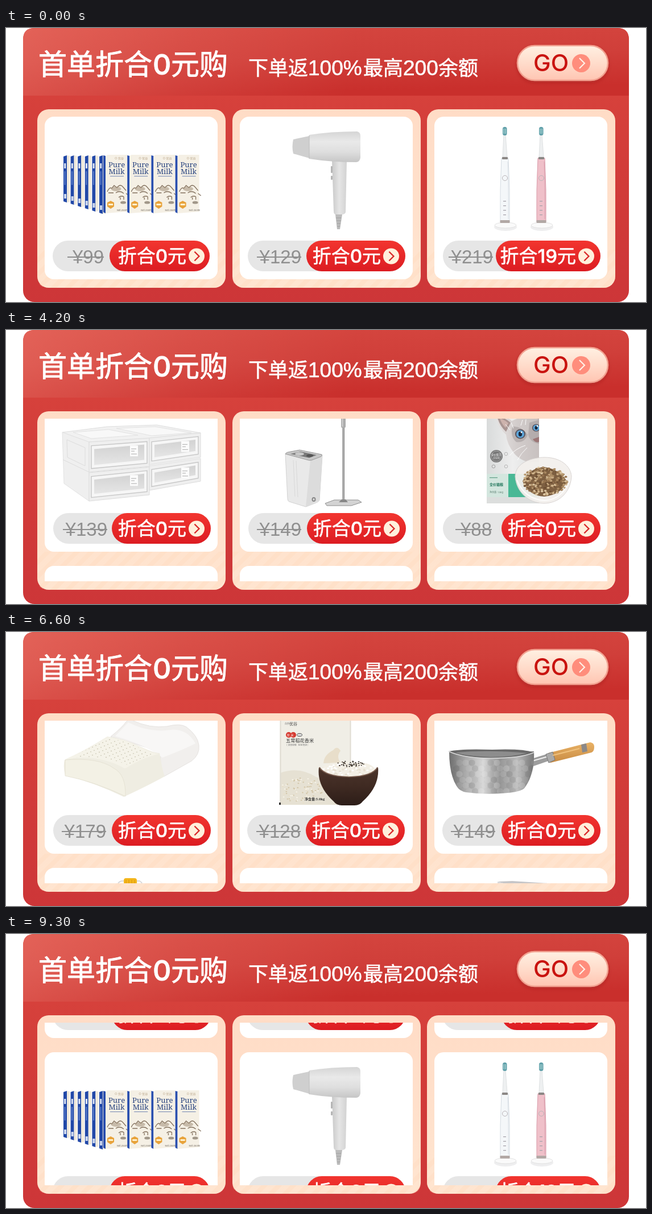
An HTML page for the animation above (9.4 s loop, 1125 by 482 pixels).

```html
<!DOCTYPE html>
<html lang="zh">
<head>
<meta charset="utf-8">
<style>
html, body { margin: 0; width: 100%; height: 100%; overflow: hidden; background: #fff; }
svg { display: block; width: 100vw; height: 100vh; }
text { font-family: Inter, 'Noto Sans CJK SC', 'Noto Sans CJK', sans-serif; }
.serif { font-family: 'Noto Serif', 'Noto Sans CJK SC', serif; }
.digits { font-family: 'Liberation Sans', 'Noto Sans CJK SC', sans-serif; }
.title { font-weight: 500; stroke: #fff; stroke-width: .9px; }
.medium { font-weight: 500; stroke: #fff; stroke-width: .6px; }
</style>
</head>
<body>
<svg id="stage" viewBox="0 0 1125 482" xmlns="http://www.w3.org/2000/svg"></svg>
<script>
const LOOP = 9400, PITCH = 311, STEPS = 6, STEP_MS = 100;
const SLIDES = [1800, 4200, 6600, 8900];

let seed = 7;
const rand = () => (seed = (seed * 16807) % 2147483647) / 2147483647;
const times = (n, fn) => Array.from({ length: n }, (_, i) => fn(i)).join('');

const path = (d, fill, more = '') => `<path d="${d}" fill="${fill}" ${more}/>`;
const line = (d, stroke, width = 1, more = '') => path(d, 'none', `stroke="${stroke}" stroke-width="${width}" ${more}`);
const rect = (x, y, w, h, fill, rx = 0, more = '') =>
  `<rect x="${x}" y="${y}" width="${w}" height="${h}" rx="${rx}" fill="${fill}" ${more}/>`;
const oval = (cx, cy, rx, ry, fill, more = '') =>
  `<ellipse cx="${cx}" cy="${cy}" rx="${rx}" ry="${ry}" fill="${fill}" ${more}/>`;
const text = (x, y, size, fill, str, more = '') =>
  `<text x="${x}" y="${y}" font-size="${size}" fill="${fill}" ${more}>${str}</text>`;
const gradient = (id, stops, dir = 'x2="0" y2="1"') => `<linearGradient id="${id}" ${dir}>` +
  stops.map((c, i) => `<stop offset="${i / (stops.length - 1)}" stop-color="${c}"/>`).join('') + '</linearGradient>';
const clip = (id, d) => `<clipPath id="${id}"><path d="${d}"/></clipPath>`;
const clipped = (id, body) => `<g clip-path="url(#${id})">${body}</g>`;
const specks = (n, cx, cy, rx, ry, size, colors) => times(n, () => {
  const a = rand() * 6.283, r = Math.sqrt(rand());
  const x = cx + Math.cos(a) * r * rx, y = cy + Math.sin(a) * r * ry;
  return oval(x.toFixed(1), y.toFixed(1), size, size * .75, colors[Math.floor(rand() * colors.length)]);
});

function milk() {
  const side = times(6, i => {
    const x = 101 + i * 12.6, b = 306 + i * 4;
    return path(`M${x} 226L${x + 6} 224V${b + 1}L${x} ${b - 1}Z`, '#2148a8') +
      path(`M${x + 6} 224L${x + 11} 225V${b}L${x + 6} ${b + 1}Z`, '#efe9dc') +
      rect(x + 1.2, 238, 3, 9, '#dfe6f5') + rect(x + 1.5, 252, 2, 24, '#5d7fcb') + rect(x + 1, b - 14, 4, 8, '#cfd9ef');
  });
  const front = times(4, i => {
    const x = 175 + i * 42.2, c = x + 19.5;
    const hills = `M${x + 3} 288q4-9 8-6l4-5 5 4q6-8 11-1l5 6m-31 4h9m4 0q7-5 14 1m-9 7q5-4 9-1v5m-6-4v4m10-11l5 4`;
    return path(`M${x - 4} 224L${x} 225V326L${x - 4} 324Z`, '#2a4fae') +
      path(`M${x} 226L${x + 3} 223H${x + 38}V323L${x} 326Z`, '#f5f0e5') +
      text(x + 24, 231, 5, '#b9a58a', '○ 优谷', 'text-anchor="middle"') +
      ['Pure', 'Milk'].map((s, k) => text(c, 245 + k * 11.5, 13, '#28437f', s, 'class="serif" text-anchor="middle"')).join('') +
      rect(x + 8, 260, 24, 1.3, '#8d9bbd') +
      line(hills, '#84725f', 1.3) + oval(c - 1, 283, 9, 4, '#a99882', 'opacity=".6"') + oval(x + 31, 307, 5, 2.5, '#7d7062', 'opacity=".7"') +
      path(`M${x + 9} 304l6 3v7l-6 4-6-4v-7Z`, '#e8a33b') + rect(x + 5, 309, 8, 3, '#fff1ce') +
      text(x + 20, 322, 4, '#6f675e', 'Net:250ml');
  });
  return side + front;
}

const dryer = () =>
  path('M573 233H599L597 324Q596 328 590 328H580Q576 328 576 322Z', 'url(#gripTone)') +
  path('M579 328H591L587 354H582Z', '#bcbcbc') + line('M580 334h9m-8 5h8m-7 5h6m-6 5h5', '#999', .8) +
  path('M533 188Q570 182 617 182Q623 183 623 190V228Q622 235 616 236Q570 236 533 230Z', 'url(#dryerTone)') +
  path('M505 196L533 190V229L505 221Q502 209 505 196Z', '#cfcfcf') + line('M533 189V230', '#bdbdbd') +
  rect(571, 243, 3, 12, '#b5b5b5', 1) + rect(571, 260, 3, 7, '#b5b5b5', 1);

const brush = (x, tone, edge) =>
  oval(x + 1, 350, 20, 7, '#eeeeef') + oval(x + 1, 347, 19, 5, '#fafafa', 'stroke="#e2e2e2"') +
  path(`M${x - 2} 187L${x - 4} 227H${x + 4}L${x + 1} 187Z`, '#eef0f1', 'stroke="#d9dcde" stroke-width=".8"') +
  rect(x - 4, 174, 7.5, 15, '#5f9fa9', 3.5) + line(`M${x - 2} 177v9m3-9v9`, '#c9e9e4', 1) +
  path(`M${x - 6} 229H${x + 6}Q${x + 9} 285 ${x + 8} 341H${x - 8}Q${x - 9} 285 ${x - 6} 229Z`, tone, `stroke="${edge}" stroke-width="1"`) +
  line(`M${x + 5} 235Q${x + 7} 290 ${x + 6} 336`, edge, 1.5, 'opacity=".6"') +
  rect(x - 5, 227, 10, 4, '#8b8785', 1) + rect(x - 8.5, 338, 17, 5, '#b2a8a5', 1) +
  oval(x, 264, 4.5, 4.5, tone, 'stroke="#b9b4b8"') + times(4, i => rect(x - 3, 304 + i * 8, 5, 1.3, '#a5a2aa'));

function drawers() {
  const unit = (x1, x2, y1, y2, h1, h2) => {
    const ix = x1 + 4, jx = x2 - 4, slope = (y2 - y1) / (x2 - x1);
    const at = (x, k) => (y1 + slope * (x - x1) + k).toFixed(1);
    const label = jx - 30;
    return path(`M${x1} ${y1}L${x2} ${y2}V${y2 + h2}L${x1} ${y1 + h1}Z`, '#efefef', 'stroke="#dcdcdc"') +
      path(`M${ix} ${at(ix, 7)}L${jx} ${at(jx, 6)}V${at(jx, h2 - 6)}L${ix} ${at(ix, h1 - 6)}Z`, '#f6f6f6', 'stroke="#c4c4c4" stroke-width="1.3"') +
      path(`M${ix + 5} ${at(ix + 5, 13)}L${jx - 5} ${at(jx - 5, 11)}V${at(jx - 5, h2 - 12)}L${ix + 5} ${at(ix + 5, h1 - 12)}Z`, 'url(#drawerTone)') +
      rect(label, at(label, 11), 14, 19, '#fbfbfb') + line(`M${label + 2} ${at(label, 17)}h9m-9 4h6m-6 5h10`, '#bbb', 1.2);
  };
  return path('M99 232L178 222L265 219L342 233L252 243L146 249Z', '#f1f1f1', 'stroke="#dedede"') +
    path('M118 232L180 227L232 237L150 243ZM194 225L262 222L326 233L256 238Z', '#f8f8f8', 'stroke="#e2e2e2"') +
    path('M99 232L146 249V353L102 322Z', '#efefef', 'stroke="#e2e2e2"') + line('M100 280L146 302M107 245L139 259V291L108 276Z', '#dcdcdc') +
    unit(146, 252, 249, 242, 53, 50) + unit(146, 252, 303, 293, 50, 49) +
    unit(252, 342, 242, 233, 47, 43) + unit(252, 342, 291, 278, 43, 40);
}

const mop = () =>
  path('M491 270L535 281L556 273L551 351Q550 354 545 356L527 363L498 354Q495 353 495 349Z', '#e9e9e9', 'stroke="#d2d2d2"') +
  path('M535 281L556 273L551 351L527 363Z', '#dcdcdc') +
  path('M491 270Q492 267 500 266L516 263L555 271Q557 273 553 275L537 281Q533 282 528 280Z', '#c6c6c6', 'stroke="#999"') +
  path('M500 270L518 266L546 272L533 277Z', '#777') + oval(516, 270, 8, 3, '#c9c9c9') + oval(534, 273, 6, 2.5, '#555') +
  line('M510 282L513 346M505 281L508 345', '#d8d8d8') + oval(541, 350, 3.5, 4, '#888') + oval(541, 350, 1.5, 2, '#ddd') +
  line('M593 224V355', '#8d8d8d', 4) + line('M592.5 224V353', '#cfcfcf', 1.3) +
  rect(589, 180, 8, 44, '#acacac', 2) + rect(590.5, 182, 2, 40, '#cfcfcf') + oval(593, 176, 3, 4, 'none', 'stroke="#d5d5d5" stroke-width="2"') +
  path('M561 357L577 351H619L625 355L607 361H564Z', '#d3d3d3', 'stroke="#8d8d8d"') + path('M585 355l5-5h7l4 5Z', '#888');

const eye = (x, y, s) => oval(x, y, s * 1.3, s * 1.2, '#5d5861') + oval(x, y, s, s * .95, '#5da7dc') +
  oval(x, y, s * .45, s * .6, '#17273d') + oval(x + 2, y - 3, 1.4, 1.4, '#fff');

const catFood = () =>
  rect(845, 180, 92, 177, 'url(#bagTone)') + rect(845, 180, 92, 4, '#45b491') + rect(848, 186, 30, 1.5, '#888') +
  clipped('bagClip',
    path('M860 199Q878 202 889 212Q908 203 922 204Q928 190 937 183V284Q910 288 894 270Q880 252 879 236Q864 224 860 199Z', 'url(#furTone)') +
    path('M863 203Q877 206 887 215L879 231Q867 220 863 203ZM924 206Q930 191 937 186V209Z', '#a99592') +
    path('M868 207Q878 211 883 216L878 224Q871 217 868 207Z', '#cdb3ad') +
    path('M890 222Q905 220 917 236Q912 251 897 249Q886 240 890 222ZM920 215L937 210V252Q921 250 918 236Z', '#aaa1a2', 'opacity=".65"') +
    eye(904, 235, 7) + eye(932, 224, 5.5) +
    path('M926 244L937 240V249Q930 251 926 244Z', '#9c7676') +
    line('M913 255Q897 260 885 273M916 259Q905 269 899 281M886 228l-8-10m14 7l-4-10M908 210l-3 10m9-11l-1 10', '#fff', .9)) +
  oval(862, 274, 11, 11, '#777') + oval(862, 274, 9, 9, 'none', 'stroke="#bbb" stroke-width=".7"') +
  text(862, 273, 4.5, '#fff', '全价配方', 'text-anchor="middle"') + text(862, 279, 4, '#ddd', '成猫粮', 'text-anchor="middle"') +
  times(4, i => oval(857 + i % 2 * 22, 292 - (i > 1 ? 22 * (i - 2) : 0), 2.8, 2.8, 'none', 'stroke="#aaa" stroke-width=".8"')) +
  rect(845, 305, 38, 41, '#d3e6de') + rect(883, 305, 54, 41, '#49b895') + rect(845, 346, 92, 11, '#dcdedd') +
  text(850, 326, 6, '#24785d', '全价猫粮', 'font-weight="600"') + text(850, 339, 4, '#587c6d', '净含量: 1.5kg') + rect(850, 311, 14, 1.4, '#6ca690') +
  path('M895 310C895 285 925 276 947 276C973 276 993 290 994 310C992 338 972 357 945 357C917 356 897 336 895 310Z', '#f3f0ed', 'opacity=".95" stroke="#d6d1cf"') +
  path('M908 318Q920 295 946 293Q972 296 986 318Q976 342 946 345Q918 343 908 318Z', '#7d5f41') +
  specks(240, 947, 318, 40, 25, 2.3, ['#93714d', '#b89a72', '#d0b48c', '#6e5034', '#aa8a62', '#dcc6a2']) +
  line('M898 316Q912 350 947 352Q978 350 991 316', '#fff', 2, 'opacity=".8"');

const pillow = () =>
  path('M184 236Q204 220 211 210Q214 206 221 207Q253 222 283 218Q306 212 317 219Q337 234 339 251Q341 268 326 279L278 306Q271 290 271 263Q232 250 184 236Z', '#f1efed', 'stroke="#e6e3e0"') +
  path('M215 211Q252 230 291 224Q318 222 333 248Q316 257 275 273Q246 251 192 235Z', '#f8f7f6') +
  path('M103 277Q138 261 178 236Q206 239 235 253Q260 265 270 265Q274 293 279 306Q250 322 207 342Q153 316 104 304Q100 289 103 277Z', '#efede2') +
  path('M104 276Q144 258 178 237Q212 241 239 256Q257 266 270 266Q238 274 215 289Q208 294 205 290Q159 266 104 276Z', '#f5f3e9') +
  path('M104 277Q163 272 190 292Q211 303 210 341Q155 315 104 305Z', '#f3f1e5', 'stroke="#e2dfd0" stroke-width=".8"') +
  clipped('foamClip', times(11, r => times(16, c => oval(116 + c * 6 + r * 9, 270 - c * 2.6 + r * 3.2, 1.2, .8, '#cecab8'))));

const rice = () =>
  path('M482 185H606V356H481Z', '#f0eee6') + path('M482 300Q515 288 545 307Q575 320 606 300V356H481Z', '#dfd7c5', 'opacity=".55"') +
  specks(110, 520, 330, 38, 23, 1.4, ['#f8f4e8', '#d2c5a8', '#e9dfc9']) +
  path('M558 283Q559 268 575 260Q582 251 588 261Q580 271 588 282Z', '#e4d7bd', 'opacity=".7"') +
  line('M482.5 187V355M605.5 188V282', '#dfdcd2', 2) + rect(480, 352, 3, 4, '#333') +
  path('M526 185H562V195Q561 201 554 201H534Q527 201 526 195Z', '#e12d25') + rect(532, 190, 24, 7, '#f7ece7', 3.5) +
  text(490, 215, 4, '#777', '自然') + text(498, 216, 7, '#444', '优谷', 'class="serif"') +
  oval(497, 233, 5, 5, '#d53a30') + oval(505, 233, 5, 5, '#d53a30') + text(494, 235, 5, '#fff', '新 米') + oval(516, 233, 4.5, 2.5, '#ddd', 'stroke="#555"') +
  text(492, 246, 8.2, '#333', '五常稻花香米', 'class="serif"') + text(493, 252, 3.8, '#777', '( 清香软糯 · 粒粒饱满 )') +
  text(525, 348, 6, '#333', '净含量:5.0kg', 'class="serif" font-weight="600"') +
  path('M554 293Q562 281 582 282Q600 276 619 282Q641 281 650 294Q639 304 602 306Q565 304 554 293Z', '#f3efe5') +
  specks(100, 602, 294, 44, 11, 2, ['#fff', '#e8e1d3', '#f6f2e9']) + specks(40, 603, 284, 26, 5.5, 1.2, ['#211d1a', '#473b32']) +
  path('M550 290Q560 306 603 307Q644 306 654 290Q657 323 627 350Q622 357 613 357H590Q581 357 576 350Q546 323 550 290Z', 'url(#bowlTone)') +
  line('M551 290Q560 306 603 307Q644 306 653 290', '#76594a', 1.6);

const panBody = 'M779 262H928Q930 302 911 327Q904 333 882 335Q845 339 809 334Q797 332 792 323Q779 302 779 262Z';
const pan = () =>
  path('M924 275L953 266L956 278L927 288Z', '#9d9d9d') + line('M925 279L956 270', '#eee', 2) +
  path('M953 265L1027 246Q1034 247 1034 254Q1034 262 1029 264L957 282Q951 277 953 265Z', 'url(#woodTone)') +
  path('M949 267L961 263L965 277L954 282Z', '#aaa', 'stroke="#777"') + path('M1011 250l9-2 2 14-9 2Z', '#8b8988') + line('M961 269L1008 257', '#f0c27e', 2) +
  path(panBody, 'url(#steelTone)') +
  clipped('panClip', times(6, r => times(14, c => oval(786 + c * 11 + r % 2 * 5.5, 282 + r * 10, 5.7, 5.6, c % 3 ? '#fff' : '#555', `opacity="${(.04 + (r * 7 + c * 5) % 4 * .04).toFixed(2)}"`)))) +
  path('M778 262Q800 257 855 259Q910 257 927 264Q903 274 852 274Q798 272 778 262Z', '#696969') +
  path('M790 264Q848 259 916 265Q890 272 852 272Q807 270 790 264Z', '#8d8d8d') +
  line('M778 262Q805 274 852 274Q905 274 928 264', '#d8d8d8', 1.5);

const oil = () =>
  line('M202 194Q191 183 203 179H235Q243 184 237 193', '#dadada', 2) +
  path('M198 195H238Q244 207 260 223V252L256 256V350Q255 356 247 356H188Q178 356 179 349V256L178 250V223Q194 208 198 195Z', 'url(#oilTone)', 'stroke="#e3cf95" stroke-width=".8"') +
  path('M198 196H238Q241 206 249 212H188Q195 206 198 196Z', '#f1eee5') + path('M187 211H250L259 225H179Z', '#f3dc8d') +
  line('M198 219L188 247M246 219L253 246M218 215V246M180 239H259M182 247H256', '#fff7d6', 2, 'opacity=".7"') +
  line('M180 233Q218 238 259 233M207 214L203 246M232 214L236 246', '#d9b04b', 1, 'opacity=".6"') +
  rect(207, 174, 23, 17, '#f4b61c', 4) + rect(204, 190, 29, 5, '#e7a716', 2) + line('M211 177v11m5-11v11m5-11v11m5-11v11', '#d8930a', 1) +
  rect(179, 252, 80, 81, '#f0b323') + rect(184, 254, 73, 47, 'url(#labelTone)') +
  oval(195, 264, 9, 7, '#8b5f22') + oval(195, 264, 5, 4, '#3a2814') + oval(250, 261, 8, 6, '#f3cb4a') + oval(190, 287, 5, 7, '#f0d28a', 'opacity=".6"') +
  path('M199 277Q219 270 240 277Q238 298 219 299Q202 298 199 277Z', '#f9e6b4', 'stroke="#fff" stroke-width="1.2"') + oval(219, 283, 17, 6, '#e8b136') +
  path('M220 268Q216 261 224 258Q234 258 233 265Q229 270 224 269L220 283Z', '#fbf0cd') +
  rect(189, 301, 62, 22, '#faf5e9') + text(196, 310, 4.6, '#333', '压榨葵花籽油', 'font-weight="700"') + rect(196, 313, 3, 2, '#777') +
  text(196, 319, 2.6, '#777', '物理压榨 原香') + text(233, 319, 4, '#444', '○ 优谷') + text(195, 330, 4.6, '#604410', '净含量: 5L') +
  line('M181 341Q218 351 257 341M180 348Q218 356 256 348', '#dcb75c', 1.2) + line('M190 336v14m22-12v15m23-13v12', '#fff6cf', 3);

const frontShoe = 'M474 248C480 225 501 222 520 229C550 220 566 233 566 256C584 262 604 276 610 301C600 323 551 327 530 322C506 312 483 299 467 285C463 272 467 259 474 248Z';
const backShoe = 'M530 217C543 203 561 211 577 219C602 205 626 220 621 246C646 258 664 269 667 286C656 299 628 306 608 303C592 283 568 270 560 252Z';

function shoes() {
  // Nested wavy bands wrap from the heel side over to the toe.
  const bands = (x, y, toeX, toeY) => times(5, i => line(
    `M${x + i * 5} ${y + i * 11}c18 9 26-${4 + i} 42 ${i - 6}S${toeX - 16} ${toeY - 18 + i * 7} ${toeX} ${toeY + i * 8}`, '#7683b0', 6.5));
  const badge = (x, y) => oval(x, y, 16, 14, '#7985b2') + oval(x, y, 11, 9.5, '#d6e4ef') + oval(x, y, 7, 5.5, '#f4f7fb', 'stroke="#7481ad" stroke-width="1.5"');
  return line('M533 214Q529 193 538 192Q547 194 546 209', '#cfdfeb', 5) +
    path('M608 301Q650 303 668 284Q671 296 659 303Q635 314 608 315Z', '#f1f2f5', 'stroke="#dcdfe6"') +
    path(backShoe, '#d4e4ef') +
    clipped('backClip', bands(552, 245, 650, 270) + path('M636 280Q652 263 669 283Q655 302 622 303Z', '#8793bd')) + badge(602, 231) +
    line('M480 237Q462 237 467 226Q480 221 492 230', '#d2e2ee', 6) +
    path('M463 278Q478 299 528 321Q576 327 611 299Q616 316 596 326Q555 340 527 341Q497 327 464 295Q460 287 463 278Z', '#f4f5f7', 'stroke="#dcdfe6"') +
    line('M481 297l-3 9m19 1l-3 10m20-3l-4 12', '#d5d9e2', 2) +
    path(frontShoe, '#d5e5f0') +
    clipped('frontClip', bands(496, 264, 590, 286) +
      path('M464 281Q466 258 476 246L494 258L498 276L484 296Z', '#8490bb') + path('M568 312Q586 281 611 295V326H560Z', '#8692bd')) +
    path('M493 230Q506 224 520 231L526 254Q509 262 497 250Z', '#6d789f') + rect(500, 241, 15, 6, '#c6d0df', 1) + badge(545, 243) +
    line('M467 284Q492 308 530 321Q576 326 609 300', '#fff', 1.5);
}

const cart = () =>
  line('M867 186V344M893 195V350M947 187V342M919 183V330', '#b0b2b4', 2.8) + line('M866.5 187V344M947.5 187V342', '#dedede', 1) +
  [179, 227, 275, 321].map(y =>
    path(`M864 ${y + 1}L890 ${y}L951 ${y + 4}L893 ${y + 10}Z`, '#c6c6c8') +
    path(`M864 ${y + 1}L893 ${y + 9}V${y + 23}L864 ${y + 16}Z`, '#dadadc') +
    path(`M893 ${y + 9}L951 ${y + 4}V${y + 17}L893 ${y + 23}Z`, '#e6e6e8', 'stroke="#d2d2d2" stroke-width=".6"')).join('') +
  [182, 230, 278].map(y => line(`M934 ${y + 4}h9`, '#bbb', 2)).join('') +
  [[866, 348], [927, 356], [947, 349]].map(([x, y]) => oval(x, y, 4, 4.5, '#333') + oval(x, y + 1, 1.5, 1.5, '#999') + rect(x - 2, y - 7, 4, 4, '#555')).join('');

const arrow = (x, y, s, color, width) => line(`M${x - s * .45} ${y - s}L${x + s * .55} ${y}L${x - s * .45} ${y + s}`, color, width);

// Each offer: grey start, red start, red end, price, price right edge, deal
const PAGES = [
  { art: () => milk() + dryer() + brush(877, '#f4f7f9', '#d5dce2') + brush(941, '#efc0c9', '#d99dab'),
    offers: [[82, 182, 358, 99, 171], [425, 528, 702, 129, 518], [768, 861, 1045, 219, 855, '折合19元']] },
  { art: () => drawers() + mop() + catFood(),
    offers: [[83, 186, 360, 139, 177], [426, 529, 703, 149, 518], [768, 871, 1045, 88, 853]] },
  { art: () => pillow() + rice() + pan(),
    offers: [[83, 186, 360, 179, 175], [424, 527, 701, 128, 517], [767, 871, 1045, 149, 859]] },
  { art: () => oil() + shoes() + cart(),
    offers: [[82, 186, 360, 89, 170], [424, 527, 702, 129, 516], [767, 871, 1045, 189, 859]] }
];

function offer([grey, red, end, price, right, deal = '折合0元']) {
  const dot = end === 358 ? 335 : end - 25, strike = right - (price > 99 ? 77 : 63);
  return rect(grey, 374, end - grey, 54, '#e6e6e6', 27) + rect(red, 374, end - red, 54, 'url(#dealTone)', 27) +
    text(right + 1, 413.5, 33, '#8f8f8f', '¥' + price, 'class="digits" text-anchor="end"') + rect(strike, 402, right + 1 - strike, 2, '#8f8f8f') +
    text(dot - 18, 413, 33, '#fff', deal, 'class="medium" text-anchor="end"') +
    oval(dot, 401.5, 14, 14, '#fff0dc') + arrow(dot, 401.5, 8, '#d9292a', 2.4);
}

const COLUMNS = [55, 398, 740];
const page = ({ art, offers }) => COLUMNS.map(x => rect(x + 13, 156, 304, 286, '#fff', 16)).join('') + art() + offers.map(offer).join('');
const pages = PAGES.map(page);
pages.push(pages[0]);

const defs = `<defs>
${gradient('headTone', ['#d5463f', '#d03f3a', '#c92f2c'], 'x2=".2" y2="1"')}
${gradient('headGlow', ['#ff9a8a55', '#ff9a8a22', '#ff9a8a00'], 'gradientUnits="userSpaceOnUse" x1="30" y1="0" x2="600" y2="110"')}
${gradient('bodyTone', ['#da463e', '#d23c39', '#cd3638'])}
${gradient('goTone', ['#fff0e2', '#ffdccb', '#ffc5b2'])}
${gradient('dealTone', ['#f2352f', '#dc1c22'])}
${gradient('cardTone', ['#ffdcc6', '#ffe0cb', '#ffe5d0'])}
${gradient('dryerTone', ['#d5d5d5', '#e9e9e9', '#dedede', '#c6c6c6'])}
${gradient('gripTone', ['#c9c9c9', '#e5e5e5', '#d2d2d2'], '')}
${gradient('drawerTone', ['#d2d2d2', '#e6e6e6'])}
${gradient('bagTone', ['#d9dbdb', '#eeeeee', '#dcdede'], '')}
${gradient('furTone', ['#e6e2e1', '#d2cccb', '#c8c1c0'], '')}
${gradient('labelTone', ['#b98536', '#dba644', '#c98f35'])}
${gradient('bowlTone', ['#4c352b', '#3f2a22', '#2c1d18'])}
${gradient('woodTone', ['#e9b266', '#c88b43'])}
${gradient('steelTone', ['#6f6f6f', '#aaa', '#d5d5d5', '#929292', '#bababa', '#777'], '')}
${gradient('oilTone', ['#ecd283', '#fbedb9', '#f3d87f', '#faeab0', '#e8c768'], '')}
${clip('windowClip', 'M68 156H1057V442H68Z')}
${clip('bagClip', 'M845 180H937V357H845Z')}
${clip('foamClip', 'M110 274Q146 258 178 239Q212 243 239 258Q250 264 262 266Q238 272 214 286Q165 266 110 274Z')}
${clip('panClip', panBody)}
${clip('frontClip', frontShoe)}
${clip('backClip', backShoe)}
<pattern id="stripes" width="18" height="18" patternUnits="userSpaceOnUse" patternTransform="rotate(45)"><rect width="8" height="18" fill="#ffd9bd" opacity=".35"/></pattern>
<filter id="soft" x="-10%" y="-20%" width="120%" height="150%"><feDropShadow dx="0" dy="3" stdDeviation="3" flood-color="#8e1512" flood-opacity=".35"/></filter>
</defs>`;

const headShape = 'M30 119V20Q30 0 50 0H1075Q1095 0 1095 20V119Z';
const header = rect(30, 0, 1065, 482, 'url(#bodyTone)', 20) + path(headShape, 'url(#headTone)') + path(headShape, 'url(#headGlow)') +
  [[57, '首单折合'], [258, '0'], [290, '元购']].map(([x, s]) => text(x, 82, 50, '#fff', s, 'class="title"')).join('') +
  [[426, '下单返'], [628, '最高'], [760, '余额']].map(([x, s]) => text(x, 83, 35, '#fff', s, 'class="medium"')).join('') +
  [[531, '100%'], [698, '200']].map(([x, s]) => text(x, 83, 37, '#fff', s, 'class="digits medium"')).join('') +
  rect(899, 31, 159, 61, 'url(#goTone)', 30.5, 'stroke="#f2a190" stroke-width="2.5" filter="url(#soft)"') +
  text(927, 76, 41, '#c9130f', 'GO', 'font-weight="500"') + oval(1011, 62, 16, 16, '#ff8d7c') + arrow(1012, 62, 9, '#fff1e8', 2.2);

const cards = COLUMNS.map(x => rect(x, 143, 331, 314, 'url(#cardTone)', 20) +
  path(`M${x} 390H${x + 331}V437Q${x + 331} 457 ${x + 311} 457H${x + 20}Q${x} 457 ${x} 437Z`, 'url(#stripes)')).join('');

document.getElementById('stage').innerHTML = defs + header + cards +
  clipped('windowClip', `<g id="reel">${pages.map((p, i) => `<g transform="translate(0 ${i * PITCH})">${p}</g>`).join('')}</g>`);

const reel = document.getElementById('reel');

function draw(t) {
  const moved = SLIDES.reduce((sum, start) => sum + Math.min(STEPS, Math.max(0, Math.floor((t - start) / STEP_MS) + 1)), 0);
  reel.setAttribute('transform', `translate(0 ${-Math.round(moved * PITCH / STEPS)})`);
}

const origin = performance.now();
function tick() {
  draw((performance.now() - origin) % LOOP);
  requestAnimationFrame(tick);
}
draw(0);
requestAnimationFrame(tick);
</script>
</body>
</html>
```
